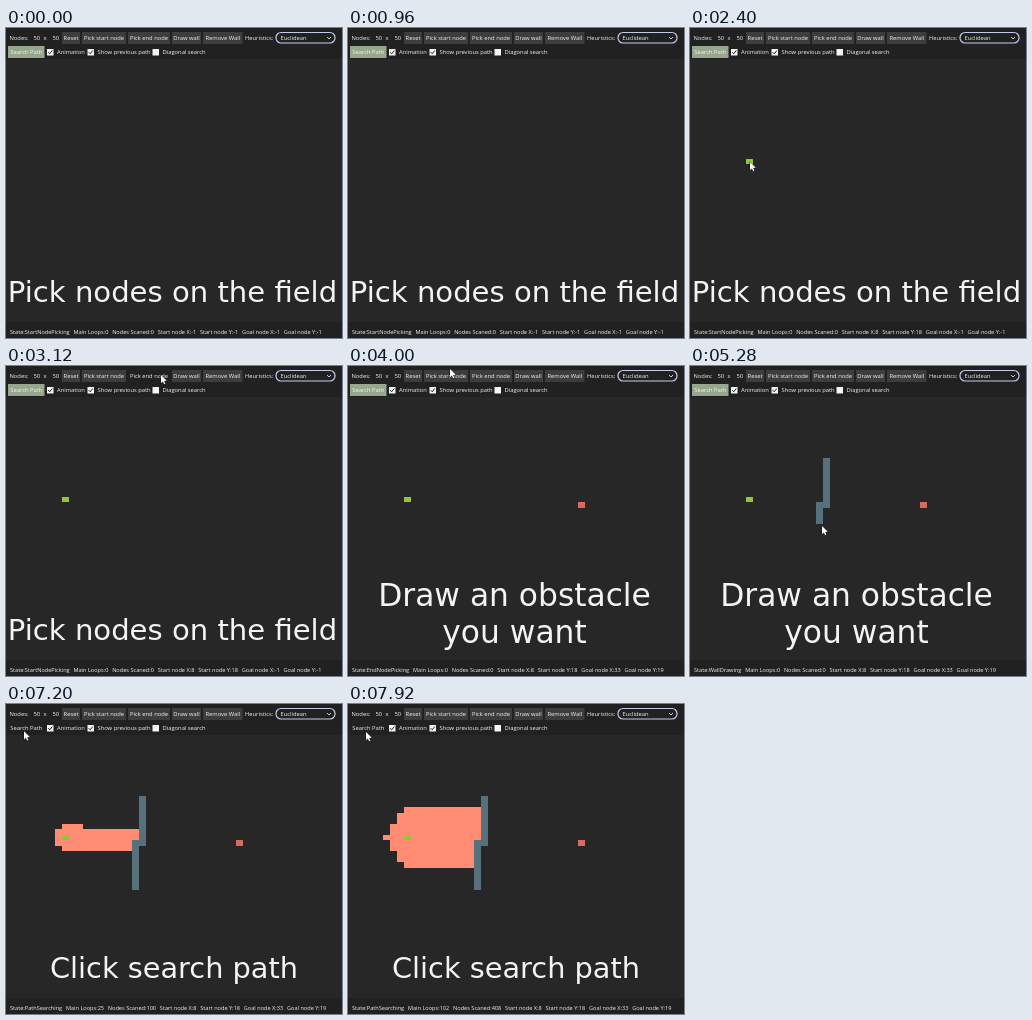
Recreate the animation shown at these times as an HTML page with a canvas. Size 336 px wide and 310 px high, loop 8 s.

```html
<!DOCTYPE html>
<html lang="en">
<head>
<meta charset="utf-8">
<title>Path search demo</title>
<style>
  html, body { margin: 0; width: 100%; height: 100%; overflow: hidden; background: #272727; }
  canvas { display: block; width: 336px; height: 310px; }
</style>
</head>
<body>
<canvas id="stage"></canvas>
<script>
const canvas = document.getElementById('stage');
const ctx = canvas.getContext('2d');
const ratio = window.devicePixelRatio || 1;
canvas.width = 336 * ratio;
canvas.height = 310 * ratio;
ctx.scale(ratio, ratio);

const LOOP = 8000, STEP = 80;
const UI = '"Open Sans", "Noto Sans", sans-serif';
const CAPTION = '"DejaVu Sans", Verdana, sans-serif';
const BAR = '#212121', BUTTON = '#3d3d3d', WHITE = '#f4f4f4';

const START = { col: 8, row: 18 }, GOAL = { col: 33, row: 19 };
const TIMES = {
  startPicked: 2400, endMode: 3200, endPicked: 3600, wallMode: 4320,
  drawing: 4640, clickCaption: 6880, search: 6960
};
const LOOP_MS = 9.4, CELL_MS = 49;

const walls = [];
for (let row = 11; row <= 19; row++) walls.push({ col: 19, row });
for (let row = 19; row <= 27; row++) walls.push({ col: 18, row });

// Time, x and y of the pointer tip
const pointerPath = [
  [1120, 112, -10], [1520, 98, 11], [1840, 98, 11], [2320, 60, 134], [2480, 60, 134],
  [3040, 155, 9], [3200, 155, 9], [3520, 234, 139], [3640, 234, 139], [4000, 102, 3],
  [4240, 180, 11], [4340, 180, 11], [4640, 136, 93], [5060, 136, 139], [5120, 131, 141],
  [5280, 132, 160], [5540, 130, 184], [5760, 130, 184], [6640, 24, 31], [6880, 18, 27],
  [8000, 18, 28]
];

const buttons = [
  ['Reset', 56, 4, 18], ['Pick start node', 76, 4, 44], ['Pick end node', 122, 4, 42],
  ['Draw wall', 166, 4, 29], ['Remove Wall', 197, 4, 39.5],
  ['Search Path', 2, 18, 36.5, '#97a78e']
];

// Discovered cells, each with the loop in which the search reached it
function searchCells() {
  const key = (c, r) => c + ',' + r;
  const seen = new Set(walls.map(w => key(w.col, w.row)));
  const node = (col, row, g, loop) =>
    ({ col, row, g, loop, f: g + Math.hypot(GOAL.col - col, GOAL.row - row) });
  const open = [node(START.col, START.row, 0, 0)], found = [];
  seen.add(key(START.col, START.row));
  for (let loop = 1; loop <= 110; loop++) {
    open.sort((a, b) => a.f - b.f);
    const { col, row, g } = open.shift();
    for (const [dc, dr] of [[1, 0], [-1, 0], [0, 1], [0, -1]]) {
      const id = key(col + dc, row + dr);
      if (seen.has(id)) continue;
      seen.add(id);
      const next = node(col + dc, row + dr, g + 1, loop);
      open.push(next);
      found.push(next);
    }
  }
  return found;
}
const found = searchCells();

function box(x, y, w, h, color) {
  ctx.fillStyle = color;
  ctx.fillRect(x, y, w, h);
}

function cell({ col, row }, color) {
  const left = c => Math.round(0.3 + 6.96 * c), top = r => Math.round(31.5 + 5.5 * r);
  box(left(col), top(row), left(col + 1) - left(col), top(row + 1) - top(row), color);
}

function label(text, x, y, size = 5.8, align = 'left', family = UI) {
  ctx.font = `${size}px ${family}`;
  ctx.textAlign = align;
  ctx.fillStyle = WHITE;
  ctx.fillText(text, x, y);
  return ctx.measureText(text).width;
}

function stroke(points, color, width) {
  ctx.beginPath();
  points.forEach(([x, y]) => ctx.lineTo(x, y));
  ctx.strokeStyle = color;
  ctx.lineWidth = width;
  ctx.stroke();
}

function pointerAt(t) {
  const i = pointerPath.findIndex(p => p[0] > t);
  if (i < 1) return { x: -20, y: -20 };
  const [t0, x0, y0] = pointerPath[i - 1], [t1, x1, y1] = pointerPath[i];
  const u = (t - t0) / (t1 - t0), e = u * u * (3 - 2 * u);
  return { x: x0 + (x1 - x0) * e, y: y0 + (y1 - y0) * e };
}

function checkbox(x, text, checked) {
  box(x, 21, 6.5, 6.5, WHITE);
  if (checked) stroke([[x + 1.2, 24.2], [x + 2.7, 25.8], [x + 5.3, 22.5]], '#222', 1);
  label(text, x + 10, 26.4);
}

function drawToolbar(pointer) {
  box(0, 0, 336, 31, BAR);
  label('Nodes:', 3.5, 12.3);
  label('50', 27.5, 12.3);
  label('x', 37.5, 12.3);
  label('50', 46.5, 12.3);
  for (const [text, x, y, w, color = BUTTON] of buttons) {
    const hovered = pointer.x >= x && pointer.x <= x + w && pointer.y >= y && pointer.y <= y + 12;
    box(x, y, w, 12, hovered ? BAR : color);
    label(text, x + w / 2, y + 8.3, 5.8, 'center');
  }
  label('Heuristics:', 239, 12.3);
  ctx.beginPath();
  ctx.roundRect(270, 4.5, 59, 10.5, 5);
  ctx.strokeStyle = '#c3cbea';
  ctx.lineWidth = 1.2;
  ctx.stroke();
  label('Euclidean', 274.5, 12.3);
  stroke([[321, 9], [323, 11], [325, 9]], WHITE, 0.8);
  checkbox(41, 'Animation', true);
  checkbox(81.5, 'Show previous path', true);
  checkbox(146.5, 'Diagonal search', false);
}

function drawField(t, loops) {
  if (loops) found.filter(n => n.loop < loops).forEach(n => cell(n, '#ff8c73'));
  const painted = Math.max(0, Math.floor((t - TIMES.drawing) / CELL_MS));
  walls.slice(0, painted).forEach(w => cell(w, '#56717b'));
  if (t >= TIMES.startPicked) cell(START, '#8fc63c');
  if (t >= TIMES.endPicked) cell(GOAL, '#d96a60');
}

function drawCaption(t) {
  const say = (text, y, size) => label(text, 166.5, y, size, 'center', CAPTION);
  if (t < TIMES.endPicked) {
    say('Pick nodes on the field', 274, 29.1);
  } else if (t < TIMES.clickCaption) {
    say('Draw an obstacle', 239.5, 31.3);
    say('you want', 277, 31.3);
  } else {
    ctx.save();
    ctx.translate(1.5, 0);
    say('Click search path', 274, 28.8);
    ctx.restore();
  }
}

function drawStatus(t, loops) {
  const state = t < TIMES.endMode ? 'StartNodePicking' : t < TIMES.wallMode ? 'EndNodePicking'
    : t < TIMES.search ? 'WallDrawing' : 'PathSearching';
  const start = t >= TIMES.startPicked ? START : { col: -1, row: -1 };
  const goal = t >= TIMES.endPicked ? GOAL : { col: -1, row: -1 };
  box(0, 294, 336, 16, BAR);
  let x = 4;
  for (const text of [
    `State:${state}`, `Main Loops:${loops}`, `Nodes Scaned:${loops * 4}`,
    `Start node X:${start.col}`, `Start node Y:${start.row}`,
    `Goal node X:${goal.col}`, `Goal node Y:${goal.row}`
  ]) x += label(text, x, 306, 5.6) + 3.8;
}

function drawPointer({ x, y }) {
  const outline = [[0, 0], [0, 8.2], [1.9, 6.5], [3.1, 9.3], [4.4, 8.7], [3.2, 6], [5.8, 5.8]];
  ctx.beginPath();
  outline.forEach(([dx, dy]) => ctx.lineTo(x + dx, y + dy));
  ctx.closePath();
  ctx.strokeStyle = '#111';
  ctx.lineWidth = 1;
  ctx.stroke();
  ctx.fillStyle = '#fff';
  ctx.fill();
}

function draw(now) {
  const t = Math.floor((now % LOOP) / STEP) * STEP;
  const loops = Math.max(0, Math.floor((t - TIMES.search) / LOOP_MS));
  const pointer = pointerAt(t);
  box(0, 0, 336, 310, '#272727');
  drawToolbar(pointer);
  drawField(t, loops);
  drawCaption(t);
  drawStatus(t, loops);
  drawPointer(pointer);
  requestAnimationFrame(draw);
}
requestAnimationFrame(draw);
</script>
</body>
</html>
```
